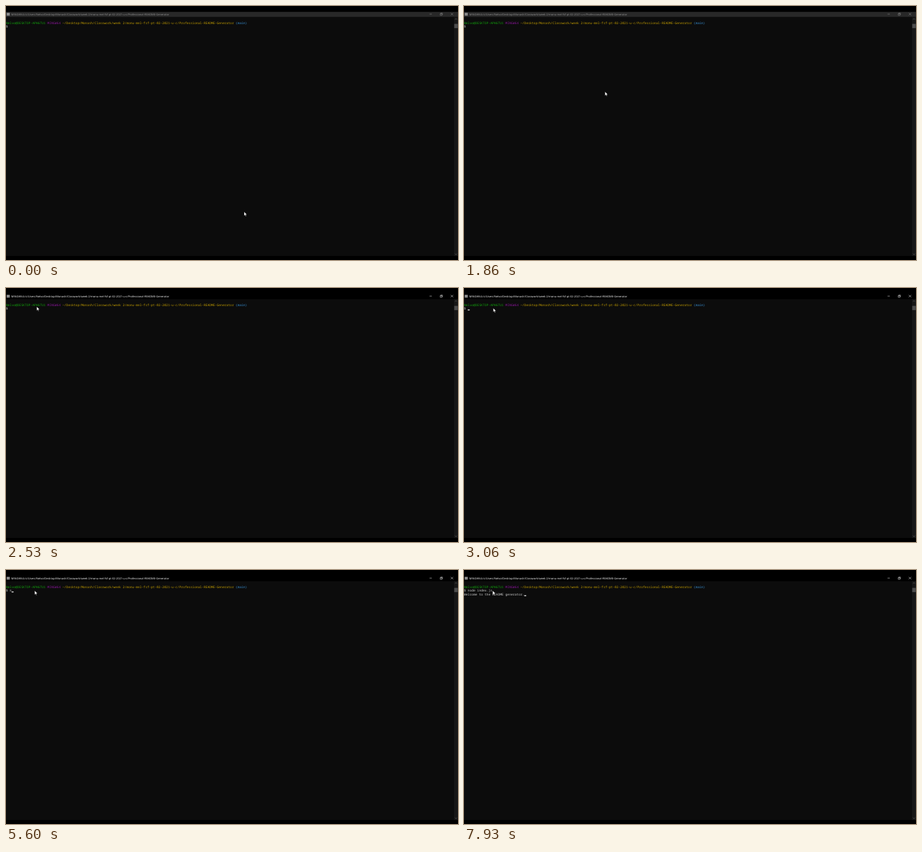
Animation of 672x378 px, one loop 8 s. Source, as an HTML page:

```html
<!DOCTYPE html>
<html lang="en">
<head>
<meta charset="utf-8">
<title>Terminal</title>
<style>
  html, body { margin: 0; width: 100%; height: 100%; overflow: hidden; background: #000; }
  svg { display: block; width: 100vw; height: 100vh; }
  text { white-space: pre; text-rendering: geometricPrecision; }
  .mono { font: 13.333px "Noto Sans Mono", monospace; fill: #ccc; }
  .title { font: 11.52px "Open Sans", sans-serif; }
  .line { fill: none; stroke-width: 1.4; }
</style>
</head>
<body>
<!-- Desktop units: 1920 x 1080, text cells of 8 x 16 -->
<svg viewBox="0 0 1920 1080">
  <rect width="1920" height="1080" fill="#000"/>
  <rect id="bar" y="25" width="1920" height="22.4"/>
  <rect y="47.4" width="1920" height="1015.6" fill="#0c0c0c"/>

  <rect x="3" y="29" width="13" height="12" fill="#8c8c8c"/>
  <text id="title" class="title" x="22.3" y="40"></text>
  <g id="buttons" class="line">
    <path d="M1799 34.5h10"/>
    <path d="M1844.500 32.500h7v7h-7zM1846.500 32.500v-2.500h7.500v7.500h-2.500"/>
    <path d="M1889.500 29.500l10 10m0 -10l-10 10"/>
  </g>

  <rect x="1903" y="47.4" width="17" height="1015.6" fill="#171717"/>
  <rect x="1904" y="76" width="15" height="18" fill="#4d4d4d"/>
  <path class="line" stroke="#777" d="M1907 58l4.500 -4.500l4.500 4.500M1907 1053l4.500 4.500l4.500 -4.500"/>

  <g id="screen" class="mono"></g>
  <rect id="block" width="8" height="16" fill="#f2f2f2"/>
  <rect id="caret" width="8" height="3.6" fill="#fff"/>
  <path id="mouse" d="M0 0V17L4 13.200L6.600 19.200L9.200 18.100L6.600 12.300H12Z"
        fill="#fff" stroke="#000" stroke-width="1"/>
</svg>
<script>
const LOOP = 8000, FPS = 15, LAST = 119;
const CELL = 8, ROW = 16, TOP = 47.4, PX = 0.35;
const USER = 'Nelvo';
const PATH = '/Desktop/Monash/Classwork/week 2/monu-mel-fsf-pt-02-2021-u-c/Professional-README-Generator';
const TITLE = 'MINGW64:/c/Users/' + USER + PATH;
const FOCUS = 38, SELECT = 48, RELEASE = 84, ENTER = 115, OUTPUT = 119;
const WELCOME = 'Welcome to the README generator.';

// [tick, x, y] of the pointer tip, in stage pixels
const POINTER = [
  [0, 354, 306.3], [3, 355.5, 311], [9, 350, 292], [11, 350, 292],
  [14, 301.7, 232], [18, 240, 146], [25, 240, 146],
  [37, 45.7, 27.7], [41, 45.7, 27.7], [48, 42.6, 30.8]
];
// [tick, text typed so far]
const TYPED = [
  [0, ''], [84, 'n'], [87, 'no'], [90, 'nod'], [93, 'node'], [96, 'node '],
  [101, 'node i'], [104, 'node in'], [105, 'node ind'], [107, 'node index.js']
];
// [tick, caret shown]
const BLINK = [[0, 0], [46, 1], [54, 0], [62, 1], [69, 0], [77, 1]];

const el = id => document.getElementById(id);
const set = (node, attrs) => {
  for (const k in attrs) node.setAttribute(k, attrs[k]);
};
const show = (node, on) => node.setAttribute('visibility', on ? 'visible' : 'hidden');
const current = (list, tick) => list.filter(k => k[0] <= tick).pop()[1];

function addText(col, row, text, fill) {
  const node = document.createElementNS('http://www.w3.org/2000/svg', 'text');
  set(node, { x: col * CELL, y: TOP + row * ROW + 12.4 });
  if (fill) node.setAttribute('fill', fill), node.style.fill = fill;
  node.textContent = text;
  el('screen').appendChild(node);
  return node;
}

addText(0, 1, USER + '@DESKTOP-APH6TU1', '#13a10e');
addText(22, 1, 'MINGW64', '#881798');
addText(30, 1, '~' + PATH, '#c19c00');
addText(122, 1, '(main)', '#3a96dd');
const command = addText(0, 2, '$');
const output = addText(0, 3, '');

function pointerAt(tick) {
  const next = POINTER.findIndex(k => k[0] > tick);
  if (next < 0) return POINTER[POINTER.length - 1].slice(1);
  const [t0, x0, y0] = POINTER[next - 1], [t1, x1, y1] = POINTER[next];
  let u = (tick - t0) / (t1 - t0);
  if (t0 === 25) u = u * u * (3 - 2 * u);
  return [x0 + (x1 - x0) * u, y0 + (y1 - y0) * u];
}

function draw(ms) {
  const tick = Math.min(LAST, Math.floor((ms + 7) * FPS / 1000));
  const active = tick >= FOCUS;
  const selecting = tick >= SELECT && tick < RELEASE;
  const ink = active ? '#fff' : '#939393';

  set(el('bar'), { fill: active ? '#000' : '#282828' });
  set(el('title'), { fill: ink });
  set(el('buttons'), { stroke: ink });
  el('title').textContent = (selecting ? 'Select ' : '') + TITLE;

  const typed = current(TYPED, tick);
  const printed = tick >= OUTPUT ? WELCOME : '';
  command.textContent = '$ ' + typed;
  output.textContent = printed;

  const row = tick >= ENTER ? 3 : 2;
  const col = row === 3 ? printed.length : 2 + typed.length;
  set(el('caret'), { x: col * CELL, y: TOP + (row + 1) * ROW - 4 });
  show(el('caret'), tick >= RELEASE || current(BLINK, tick));

  set(el('block'), { x: 15 * CELL, y: TOP + 2 * ROW });
  show(el('block'), selecting);

  const [x, y] = pointerAt(tick);
  set(el('mouse'), { transform: `translate(${x / PX} ${y / PX})` });
}

function loop() {
  draw(performance.now() % LOOP);
  requestAnimationFrame(loop);
}
loop();
</script>
</body>
</html>
```
